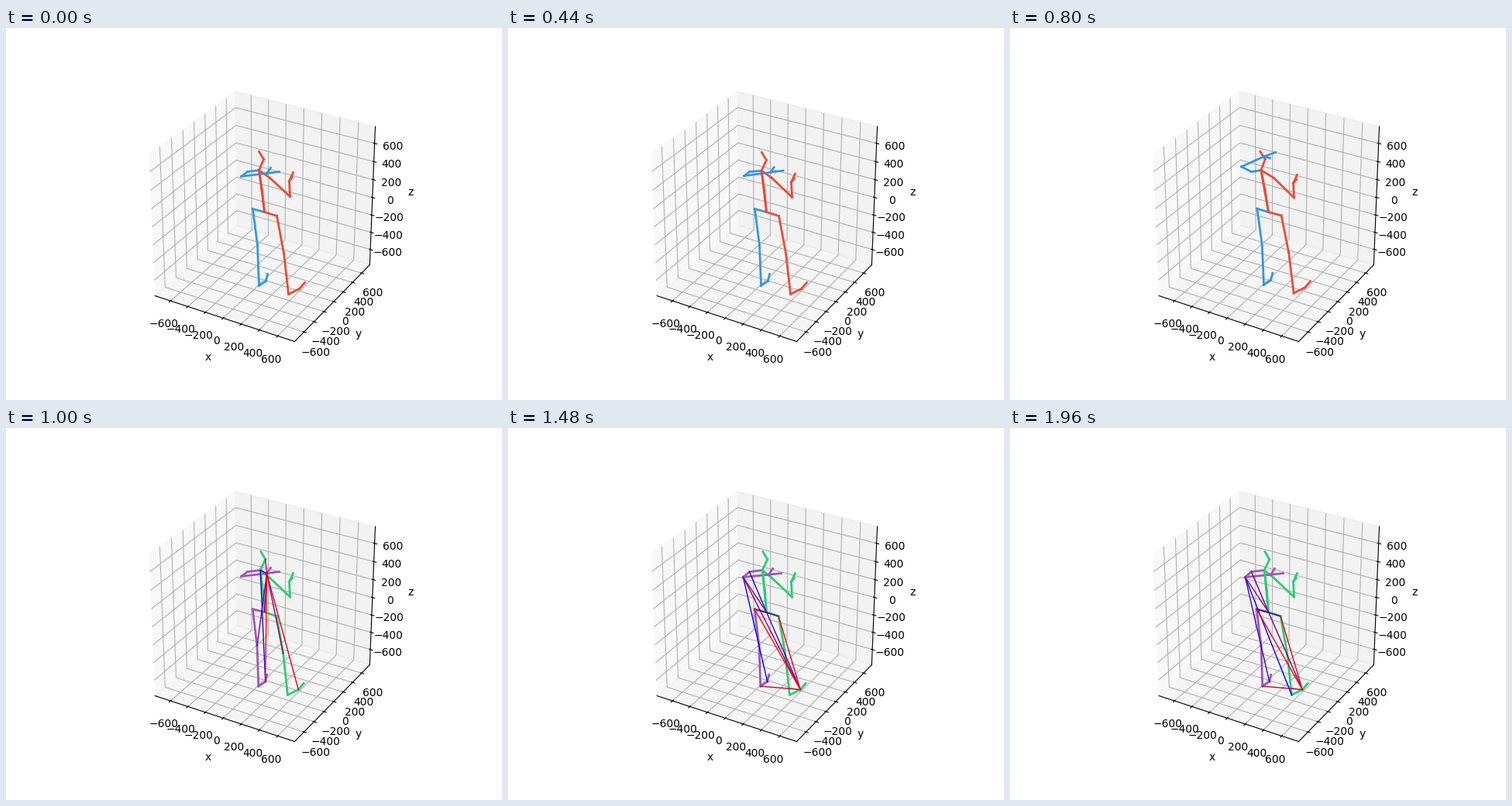
Recreate the animation shown at these times as a matplotlib script. Size 640 px wide and 480 px high, loop 2000 ms.

```python
import numpy as np
import matplotlib.pyplot as plt
from matplotlib.animation import FuncAnimation

W, H, FPS, FRAMES = 640, 480, 25, 50
SWITCH = 1000  # ms, second motion starts here
LIMIT = 750 * 25 / 24

# Rest pose in stage pixels, one chain per limb
LIMBS = {
    'r_leg': dict(hip=(333, 237), r_hip=(349, 242), r_knee=(358, 290),
                  r_heel=(364, 343), r_foot=(378, 336), r_toe=(385, 328)),
    'l_leg': dict(hip=(333, 237), l_hip=(318, 233), l_knee=(324, 280),
                  l_heel=(326, 332), l_foot=(335, 326), l_toe=(337, 317)),
    'spine': dict(hip=(333, 237), waist=(330, 209), neck=(326, 183),
                  chin=(332, 169), head=(326, 159)),
    'r_arm': dict(neck=(326, 183), r_shoulder=(340, 193), r_elbow=(366, 217),
                  r_wrist=(365, 197), r_hand=(370, 186)),
    'r_grip': dict(r_wrist=(365, 197), r_thumb=(368, 192)),
    'l_arm': dict(neck=(326, 183), l_shoulder=(311, 185), l_elbow=(303, 191),
                  l_wrist=(336, 187), l_hand=(352, 185)),
    'l_grip': dict(l_wrist=(336, 187), l_thumb=(341, 180)),
}
REST = {j: np.array(p, float) for limb in LIMBS.values() for j, p in limb.items()}
BONES = [(a, b) for limb in map(list, LIMBS.values()) for a, b in zip(limb, limb[1:])]
BONES.append(('hip', 'neck'))


def fan(hub, ends):
    return [(hub, end) for end in ends.split()]


# Links from weak (blue) to strong (red), with their start time
HIPS = [('l_hip', 'r_hip')]
CORE = [('l_elbow', 'hip')] + fan('r_foot', 'l_heel r_hip l_hip')
LINKS = [
    (1000, fan('neck', 'l_wrist l_foot')
     + fan('l_wrist', 'hip l_knee r_knee chin r_foot l_foot')),
    (1160, fan('r_foot', 'l_shoulder hip r_heel') + HIPS
     + fan('l_elbow', 'r_foot') + CORE),
    (1400, fan('l_elbow', 'l_foot') + fan('hip', 'l_shoulder') + HIPS
     + fan('r_foot', 'hip l_elbow') + CORE),
    (1720, fan('l_elbow', 'r_heel') + HIPS + fan('l_elbow', 'l_foot')
     + fan('hip', 'l_shoulder r_foot') + CORE),
]


def smooth(u):
    u = np.clip(u, 0, 1)
    return u * u * (3 - 2 * u)


def swing(pose, limb, dx, dy, start=0):
    """Shift a limb by a growing amount from its root to its tip."""
    joints = list(LIMBS[limb])[start:]
    for joint, k in zip(joints, np.sin(np.linspace(0, np.pi / 2, len(joints)))):
        pose[joint] = pose[joint] + (k * dx, k * dy)


def pose_at(t):
    if t < SWITCH:
        lean = lift = smooth((t - 400) / 500)
        sway, drop = np.sin(np.pi * t / 800), 3 * t / 800
    else:
        lean, lift, sway = -0.6, 0, 0
        drop = 1
    sag = 2 * smooth((t - SWITCH) / 300)
    reach = 3 * sway - 11 * lift, sag - sway - 28 * lift

    pose = dict(REST)
    swing(pose, 'r_leg', 2.2 * lean, -1.8 * lean)
    swing(pose, 'l_leg', 1.4 * lean, -1.4 * lean)
    swing(pose, 'spine', sway - 4 * lean, sway)
    swing(pose, 'r_arm', 0, drop, start=1)
    swing(pose, 'r_grip', 1, drop)
    swing(pose, 'l_arm', *reach, start=1)
    swing(pose, 'l_grip', 0.6 * reach[0], 0.5 * reach[1])
    return pose


fig = plt.figure(figsize=(W / 100, H / 100), dpi=100)
box = fig.add_subplot(projection='3d')
box.view_init(elev=30, azim=-60)
box.set_box_aspect((1, 1, 1), zoom=0.946753)
for name in 'xyz':
    box.set(**{f'{name}lim': (-LIMIT, LIMIT),
               f'{name}ticks': np.arange(-600, 601, 200),
               f'{name}label': name})

stage = fig.add_axes((0, 0, 1, 1))
stage.set_xlim(-0.5, W - 0.5)
stage.set_ylim(H - 0.5, -0.5)
stage.axis('off')

bones = [stage.plot([], [], lw=2)[0] for _ in BONES]
links = [stage.plot([], [], lw=1)[0] for _ in range(9)]


def draw(i):
    t = i * 1000 / FPS
    pose = pose_at(t)

    def join(line, a, b, color):
        line.set_data(*zip(pose[a], pose[b]))
        line.set_color(color)

    right, left = ('#e74c3c', '#3498db') if t < SWITCH else ('#2ecc71', '#9b59b6')
    for line, (a, b) in zip(bones, BONES):
        join(line, a, b, left if b.startswith('l_') else right)

    active = [pairs for start, pairs in LINKS if t >= start]
    pairs = active[-1] if active else []
    for k, line in enumerate(links):
        line.set_visible(k < len(pairs))
        if k < len(pairs):
            heat = k / (len(pairs) - 1)
            join(line, *pairs[k], (heat, 0, 1 - heat))
    return bones + links


anim = FuncAnimation(fig, draw, frames=FRAMES, interval=1000 / FPS, repeat=True)
plt.show()
```
